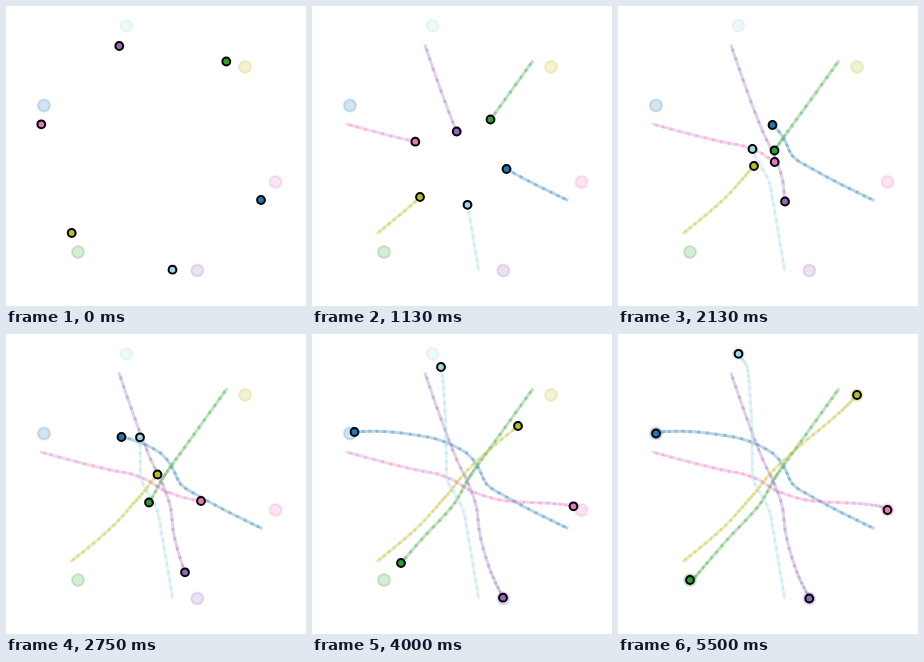
These frames come from a looping animation (300 px wide and 300 px high, 6260 ms). An HTML page with a canvas:

```html
<!DOCTYPE html>
<html lang="en">
<head>
<meta charset="utf-8">
<title>Crossing agents</title>
<style>
  html, body { margin: 0; width: 100%; height: 100%; overflow: hidden; background: #fff; }
  canvas { display: block; width: 300px; height: 300px; }
</style>
</head>
<body>
<canvas id="stage"></canvas>
<script>
const LOOP = 6260, LAST = 44;
const KEYS = [0, 9, 12, 15, 17, 22, 28, 32, 36, 44];

// Waypoints of each agent at the steps in KEYS; the last one is its goal.
const AGENTS = [
  { color: '#1f77b4', way: [[255, 194], [194.5, 163], [174.5, 150], [166, 133], [154.5, 119], [115.5, 103], [65, 97.3], [42.5, 98], [38.5, 101], [38, 99.5]] },
  { color: '#2ca02c', way: [[220.3, 55.5], [178.5, 113.5], [166.5, 130], [159.5, 140], [156.5, 144.5], [143, 168.5], [109.5, 205.5], [89, 229], [76.5, 243.5], [72, 246]] },
  { color: '#9467bd', way: [[113.3, 40], [144.7, 125.5], [156.5, 150], [165, 176], [167, 195.5], [179, 238.3], [190.3, 262], [191, 263.7], [191, 264.3], [191.3, 264.5]] },
  { color: '#e377c2', way: [[35.3, 118.3], [103.3, 135.7], [125, 140], [144, 147.5], [156.7, 156], [195, 167], [242.5, 169.7], [261.5, 172.3], [268, 175], [269.5, 176]] },
  { color: '#bcbd22', way: [[65.7, 227], [108, 191], [121, 177], [130.5, 166], [136, 160], [151.5, 140.5], [184, 110], [206, 92], [224.3, 76], [239, 61]] },
  { color: '#9edae5', way: [[166.5, 263.7], [155.5, 198.8], [151.5, 177], [141, 157], [134.5, 143], [134, 103.3], [131.5, 54], [129, 33], [124, 25], [120.5, 19.8]] }
];

// Agents start from rest and reach walking speed within a few steps.
const easeIn = k => k - 1 + Math.exp(-k);
const U = KEYS.map(easeIn);

// Monotone cubic through the values v at the times U.
function curve(v) {
  const n = v.length - 1;
  const s = U.slice(1).map((u, i) => (v[i + 1] - v[i]) / (u - U[i]));
  const m = v.map((_, i) => {
    if (i === 0 || i === n || s[i - 1] * s[i] <= 0) return 0;
    return 2 * s[i - 1] * s[i] / (s[i - 1] + s[i]);
  });
  m[0] = 1.5 * s[0] - 0.5 * m[1];
  return u => {
    let i = 0;
    while (i < n - 1 && u > U[i + 1]) i++;
    const h = U[i + 1] - U[i], p = (u - U[i]) / h, q = 1 - p;
    return q * q * (1 + 2 * p) * v[i] + p * p * (3 - 2 * p) * v[i + 1]
      + h * p * q * (q * m[i] - p * m[i + 1]);
  };
}

for (const agent of AGENTS) {
  const x = curve(agent.way.map(w => w[0]));
  const y = curve(agent.way.map(w => w[1]));
  agent.steps = Array.from({ length: LAST + 1 }, (_, k) => [x(easeIn(k)), y(easeIn(k))]);
  agent.goal = agent.steps[LAST];
}

const canvas = document.getElementById('stage');
const ctx = canvas.getContext('2d');
const scale = window.devicePixelRatio || 1;
canvas.width = canvas.height = 300 * scale;
ctx.scale(scale, scale);

function disc([x, y], r, fill, stroke, width) {
  ctx.beginPath();
  ctx.arc(x, y, r, 0, 2 * Math.PI);
  ctx.fillStyle = fill;
  ctx.fill();
  ctx.strokeStyle = stroke;
  ctx.lineWidth = width;
  ctx.stroke();
}

// Square caps overlap at the joints and leave a darker dot per step.
function trail({ steps, color }, k) {
  ctx.strokeStyle = color;
  ctx.lineWidth = 3;
  ctx.lineCap = 'square';
  for (let i = 0; i < k; i++) {
    ctx.beginPath();
    ctx.moveTo(...steps[i]);
    ctx.lineTo(...steps[i + 1]);
    ctx.stroke();
  }
}

function draw(k) {
  ctx.globalAlpha = 1;
  ctx.fillStyle = '#fff';
  ctx.fillRect(0, 0, 300, 300);
  ctx.globalAlpha = 0.2;
  for (const a of AGENTS) disc(a.goal, 6, a.color, a.color, 2);
  ctx.globalAlpha = 0.3;
  for (const a of AGENTS) trail(a, k);
  ctx.globalAlpha = 1;
  for (const a of AGENTS) disc(a.steps[k], 3.9, a.color, '#000', 2);
}

// Eight steps a second on a 10 ms clock, then a hold on the last one.
function stepAt(t) {
  let k = 0;
  while (k < LAST && Math.round(12.5 * (k + 1)) * 10 <= t) k++;
  return k;
}

let shown = -1;
function tick() {
  const k = stepAt(performance.now() % LOOP);
  if (k !== shown) draw(shown = k);
  requestAnimationFrame(tick);
}
tick();
</script>
</body>
</html>
```
